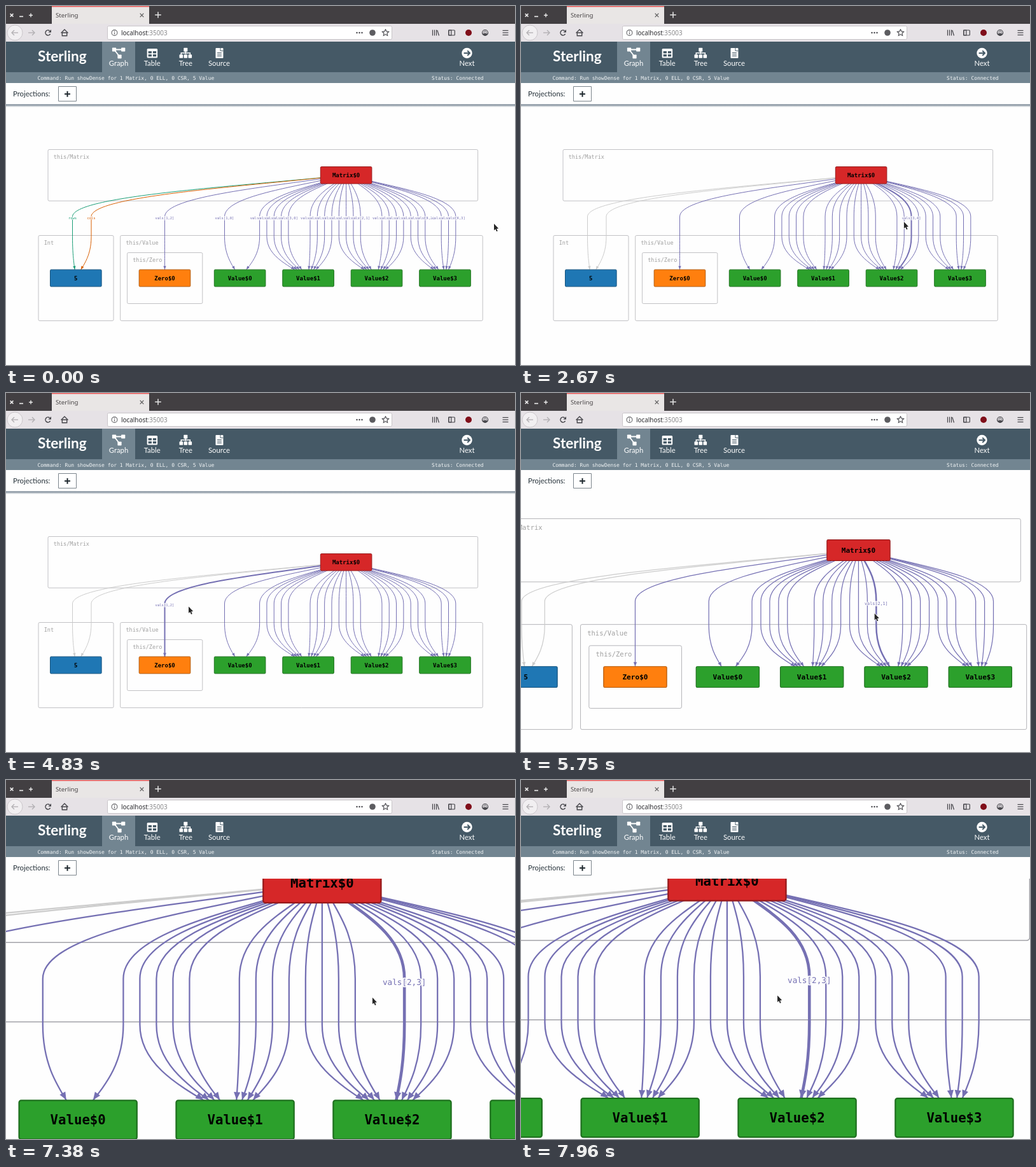
These frames come from a looping animation (800 by 564 pixels, 8000 ms). An HTML page with a canvas:

```html
<!DOCTYPE html>
<html lang="en">
<head>
<meta charset="utf-8">
<title>Sterling</title>
<style>
html, body { margin: 0; width: 100%; height: 100%; overflow: hidden; background: #fefefe; }
canvas { display: block; }
</style>
</head>
<body>
<canvas id="stage" width="800" height="564"></canvas>
<script>
const ctx = document.getElementById('stage').getContext('2d');
const LOOP = 8000, STEP = 1000 / 24;
const MONO = '"DejaVu Sans Mono", monospace';
const LATO = 'Lato, sans-serif';
const NOTO = '"Noto Sans", sans-serif';
const PAGE = '#fefefe';
const range = (n, f) => Array.from({ length: n }, (_, i) => f(i));

// ---- drawing helpers ----
function paint(fill, stroke, lw = 1) {
  if (fill) { ctx.fillStyle = fill; ctx.fill(); }
  if (stroke) { ctx.strokeStyle = stroke; ctx.lineWidth = lw; ctx.stroke(); }
}
function box(x, y, w, h, fill, stroke, lw, r = 0) {
  ctx.beginPath();
  ctx.roundRect(x, y, w, h, r);
  paint(fill, stroke, lw);
}
function tile(x, y, size, fill) {
  box(x - size / 2, y - size / 2, size, size, fill, null, 1, size / 8);
}
function disc(x, y, r, fill, stroke, lw) {
  ctx.beginPath();
  ctx.arc(x, y, r, 0, 7);
  paint(fill, stroke, lw);
}
function trace(pts) {
  ctx.beginPath();
  for (let i = 0; i < pts.length; i += 2) ctx.lineTo(pts[i], pts[i + 1]);
}
function line(color, lw, ...pts) {
  trace(pts);
  paint(null, color, lw);
}
function text(str, x, y, font, color, align = 'left') {
  ctx.font = font;
  ctx.fillStyle = color;
  ctx.textAlign = align;
  ctx.fillText(str, x, y);
}
function plus(x, y, r, color, lw) {
  line(color, lw, x - r, y, x + r, y);
  line(color, lw, x, y - r, x, y + r);
}
function cross(x, y, r, color, lw) {
  line(color, lw, x - r, y - r, x + r, y + r);
  line(color, lw, x - r, y + r, x + r, y - r);
}
function arrow(x, y, len, color, lw) {
  const tip = x + len, head = 0.8 * len;
  line(color, lw, x - len, y, tip, y);
  line(color, lw, tip - head, y - Math.abs(head), tip, y, tip - head, y + Math.abs(head));
}

// ---- graph model ----
const TOP = 265.8, LOW = 427.5, ROOT = 534.6, GAP = 11.32;
const valueX = i => 367.6 + 107.47 * i;
const nodes = [
  ['Matrix$0', ROOT, TOP, '#d62728', '#961b1c'],
  ['5', 109.8, LOW, '#1f77b4', '#16537e'],
  ['Zero$0', 249.5, LOW, '#ff7f0e', '#b3590a'],
  ...range(4, i => ['Value$' + i, valueX(i), LOW, '#2ca02c', '#1f701f'])
];
const groups = [
  ['this/Matrix', 66, 225.5, 675.6, 80.7],
  ['Int', 51, 360.5, 118, 134],
  ['this/Value', 179.7, 360.5, 569.5, 134],
  ['this/Zero', 190.5, 387.5, 118.3, 80]
];

const edge = (x, to, label, color = '#7570b3') => ({ x, to, label, color });
const run = (x, n) => range(n, i => x + GAP * i);
const lanes = [249.5, 343.5, ...run(398.6, 5), ...run(478, 8), ...run(590.9, 7), ...run(684.2, 3)];
const cells = '12 10 40 11 13 20 30 33 00 03 04 01 02 14 21 23 24 34 31 32 41 42 22 44 43'.split(' ');
const vals = lanes.map((x, i) => {
  const to = i ? valueX(Math.floor((i + 5) / 8)) : x;
  return edge(x, to, `vals[${[...cells[i]]}]`);
});
const sizes = [edge(104.5, 109.8, 'rows', '#1b9e77'), edge(134, 109.8, 'cols', '#d95f02')];

// Each edge leaves the root centre, drops straight past its label, then turns in to its node.
function drawEdge(e, color, lw) {
  const dx = e.x - ROOT, dt = e.x - e.to;
  ctx.beginPath();
  ctx.moveTo(ROOT, TOP);
  ctx.bezierCurveTo(ROOT + 0.42 * dx, TOP + 18.5, e.x, 298.5, e.x, 331);
  ctx.lineTo(e.x, 362.3);
  ctx.bezierCurveTo(e.x, 395, e.to + 0.42 * dt, LOW - 18.5, e.to, LOW);
  paint(null, color, lw);

  ctx.save();
  ctx.translate(e.to + dt / 3, 413.8);
  ctx.rotate(Math.atan2(0.58 * dt, 24.7));
  const half = 1.9 + 0.3 * lw;
  trace([0, 0, -half, -5.2, half, -5.2]);
  paint(color);
  ctx.restore();
}

function drawLabel(e) {
  ctx.font = '5.5px ' + MONO;
  ctx.textAlign = 'center';
  ctx.lineJoin = 'round';
  ctx.lineWidth = 1.6;
  ctx.strokeStyle = PAGE;
  ctx.strokeText(e.label, e.x, 335.4);
  ctx.fillStyle = e.color;
  ctx.fillText(e.label, e.x, 335.4);
  ctx.lineJoin = 'miter';
}

function drawGraph(view, hot) {
  ctx.save();
  ctx.translate(view.x, view.y);
  ctx.scale(view.k, view.k);
  for (const [name, x, y, w, h] of groups) {
    box(x, y, w, h, null, '#a2a2a8', 0.65, 2);
    text(name, x + 8.7, y + 14.2, '8.5px ' + MONO, '#a0a0a0');
  }
  for (const e of sizes) drawEdge(e, hot ? '#ccc' : e.color, 1);
  for (const e of vals) if (e !== hot) drawEdge(e, e.color, 1);
  if (hot) drawEdge(hot, hot.color, 2);
  (hot ? [hot] : [...sizes, ...vals]).forEach(drawLabel);
  for (const [name, x, y, fill, rim] of nodes) {
    box(x - 40.3, y - 13.3, 80.6, 26.6, fill, rim, 1, 1.5);
    text(name, x, y + 3.1, 'bold 9px ' + MONO, '#000', 'center');
  }
  ctx.restore();
}

// ---- motion ----
// Turning points of the pointer: time, x, y.
const GRAB = 7362;
const path = [
  [1330, 767, 342], [2670, 601.5, 339], [3400, 374, 344], [3790, 546, 346],
  [4640, 256, 334], [4750, 256, 334], [5540, 550, 347.5], [6040, 563.5, 344.5],
  [GRAB, 580, 342], [7708, 471.5, 334.5], [7958, 403, 338.5]
];
const clicks = [...range(5, i => 5580 + 110 * i), ...range(3, i => 6420 + 250 * i)];

function pointer(t) {
  const i = Math.max(1, path.findIndex(p => p[0] >= t));
  const [a, b] = t > path.at(-1)[0] ? path.slice(-2) : [path[i - 1], path[i]];
  const u = Math.min(1, Math.max(0, (t - a[0]) / (b[0] - a[0])));
  return { x: a[1] + (b[1] - a[1]) * u, y: a[2] + (b[2] - a[2]) * u };
}

// Every wheel click scales about the pointer; after the grab the graph follows it.
function viewAt(t) {
  const view = { k: 1, x: 0, y: 0 }, zoom = 2 ** 0.15;
  for (const c of clicks) {
    if (t < c - 5) break;
    const p = pointer(c);
    view.k *= zoom;
    view.x = p.x + (view.x - p.x) * zoom;
    view.y = p.y + (view.y - p.y) * zoom;
  }
  if (t > GRAB) {
    const p = pointer(t), from = pointer(GRAB);
    view.x += p.x - from.x;
    view.y += p.y - from.y;
  }
  return view;
}

// The highlight trails the pointer and takes the nearest edge in reach.
function hotAt(t, view) {
  if (t > 7000) return vals[cells.indexOf('23')];
  const x = (pointer(t - 75).x - view.x) / view.k;
  const dist = e => Math.abs(e.x - x);
  const near = vals.reduce((a, b) => dist(b) < dist(a) ? b : a);
  return dist(near) < 50 ? near : null;
}

// ---- window and page header ----
function drawTabs() {
  box(0, 0, 800, 28, '#423f42');
  box(72, 0, 153, 28, '#e9e6e5');
  box(72, 0, 153, 1.5, '#ed5f5d');
  cross(9, 14.5, 2.4, '#eee', 1.5);
  line('#eee', 1.6, 21, 16.5, 27, 16.5);
  plus(39, 14.5, 3, '#eee', 1.4);
  text('Sterling', 78, 18, '9.75px ' + NOTO, '#4a4748');
  cross(213.5, 14.5, 2.8, '#555', 1.2);
  plus(239, 14, 4.8, '#ddd', 1.6);
}

function drawToolbar() {
  const ink = '#45454a', faint = '#b0aeb1', back = '#e6e2e6', mid = 42;
  box(0, 28, 800, 28, back);
  disc(14, mid, 12, '#f1eff1', '#cac6ca');
  arrow(14, mid, -5, faint, 1.3);
  arrow(40, mid, 5, faint, 1.3);
  ctx.beginPath();
  ctx.arc(66, mid, 4, 0.5, 5.4);
  paint(null, ink, 1.5);
  trace([71, 37, 71, 41.5, 66.5, 41.5]);
  paint(ink);
  line(ink, 1.4, 86.5, 42.5, 92, 37, 97.5, 42.5);
  box(88.3, 42, 7.4, 4.7, null, ink, 1.4);

  box(159.5, 31.5, 447, 21, '#fff', '#c9c5c9', 1, 2);
  disc(170.5, mid, 4.4, null, '#66666a', 1.1);
  line('#66666a', 1.1, 170.5, 41.4, 170.5, 44.5);
  disc(170.5, 39.8, 0.7, '#66666a');
  text('localhost', 181, 45.5, '9.9px ' + NOTO, '#2a2a2e');
  text(':35003', 181 + ctx.measureText('localhost').width, 45.5, '9.9px ' + NOTO, '#8a8a8c');
  for (const d of [-4, 0, 4]) disc(555.5 + d, mid, 1.2, ink);
  disc(576, mid, 4.8, '#5c5c60');
  const star = range(11, i => {
    const a = Math.PI * (i / 5 - 0.5), r = i % 2 ? 2.6 : 5.4;
    return [596.5 + r * Math.cos(a), mid + r * Math.sin(a)];
  });
  line(ink, 1.1, ...star.flat());

  for (const d of [0, 3, 6]) line(ink, 1.2, 670.5 + d, 37.5, 670.5 + d, 46.5);
  line(ink, 1.2, 677.8, 38, 680.5, 46.5);
  box(695.8, 38, 9.5, 8, null, ink, 1.2, 1);
  box(695.8, 38, 4, 8, null, ink, 1.2);
  disc(727, mid, 5, '#800f1a');
  disc(753, mid, 4.5, null, ink, 1.2);
  ctx.beginPath();
  ctx.arc(753, mid, 4.5, 0.3, Math.PI - 0.3);
  paint(ink);
  disc(753, mid - 0.8, 2, back, ink, 0.8);
  for (const d of [-3.5, 0, 3.5]) line(ink, 1.2, 780.5, mid + d, 789.5, mid + d);
}

function drawHeader() {
  const bar = '#455966', lit = '#728591', white = '#fff', pale = '#f2f5f6';
  const navX = i => 177 + 52.65 * i;
  box(0, 56, 800, 48, bar);
  box(151, 56, 52, 48, lit);
  box(0, 104, 800, 17, lit);
  text('Sterling', 50, 86.5, 'bold 22.6px ' + LATO, white);
  const nav = (name, x) => text(name, x, 94.3, '11.3px ' + LATO, white, 'center');
  ['Graph', 'Table', 'Tree', 'Source'].forEach((name, i) => nav(name, navX(i)));
  nav('Next', 724.5);
  text('Command: Run showDense for 1 Matrix, 0 ELL, 0 CSR, 5 Value', 49.5, 115.7, '7.96px ' + MONO, pale);
  text('Status: Connected', 750.5, 115.7, '7.96px ' + MONO, pale, 'right');

  // Graph: three linked tiles
  const gx = navX(0);
  line(white, 1.8, gx + 7, 68.5, gx - 7, 68.5, gx + 1.5, 79.5);
  tile(gx - 7, 68.5, 6.2, white);
  tile(gx + 7.2, 68.5, 6.2, white);
  tile(gx + 1.5, 79.5, 6.2, white);
  // Table: a card with four cells
  const tx = navX(1);
  box(tx - 8, 67, 16.5, 14.5, white, null, 1, 1.5);
  for (const dx of [-6, 1.2]) for (const y of [71, 76]) box(tx + dx, y, 5.3, 3.4, bar);
  // Tree: one tile over three
  const rx = navX(2);
  line(white, 1.5, rx, 69, rx, 78);
  box(rx - 7, 73.8, 14, 5, null, white, 1.5);
  box(rx - 6.2, 75.5, 12.4, 5.6, bar);
  tile(rx, 68.7, 6, white);
  for (const d of [-7, 0, 7]) tile(rx + d, 79, 5.6, white);
  // Source: a sheet with a folded corner
  const sx = navX(3) + 0.5;
  box(sx - 6, 66, 12, 16, white, null, 1, 1);
  line(bar, 0.9, sx + 1.5, 66, sx + 1.5, 70.5, sx + 6, 70.5);
  for (const y of [73.5, 76, 78.5]) line(bar, 1, sx - 3.5, y, sx + 3.5, y);
  // Next
  disc(724.5, 74, 8.2, white);
  arrow(724.3, 74, 4.7, bar, 2);

  box(0, 121, 800, 34, PAGE);
  text('Projections:', 11, 142, '11.3px ' + LATO, '#26323a');
  box(82.5, 126.5, 28, 23, '#fff', '#7c858c');
  plus(96.5, 138.3, 4.5, '#1c262c', 2);
}

function drawShadow() {
  const g = ctx.createLinearGradient(0, 154, 0, 159);
  g.addColorStop(0, 'rgba(110,125,140,.5)');
  g.addColorStop(0.3, 'rgba(110,125,140,.8)');
  g.addColorStop(1, 'rgba(110,125,140,0)');
  box(0, 154, 800, 5, g);
}

function drawPointer({ x, y }) {
  ctx.save();
  ctx.translate(x, y);
  trace([0, 0, 0, 10.4, 2.3, 8.5, 4, 12.3, 5.7, 11.5, 4.1, 7.9, 7.1, 7.5]);
  ctx.closePath();
  paint(null, '#fff', 1.6);
  paint('#262626');
  ctx.restore();
}

function render(now) {
  const t = Math.floor((now % LOOP + 5) / STEP) * STEP;
  const view = viewAt(t);
  box(0, 0, 800, 564, PAGE);
  drawGraph(view, hotAt(t, view));
  drawTabs();
  drawToolbar();
  drawHeader();
  if (view.k === 1) drawShadow();
  drawPointer(pointer(t));
}

const start = performance.now();
function tick() {
  render(performance.now() - start);
  requestAnimationFrame(tick);
}
tick();
</script>
</body>
</html>
```
